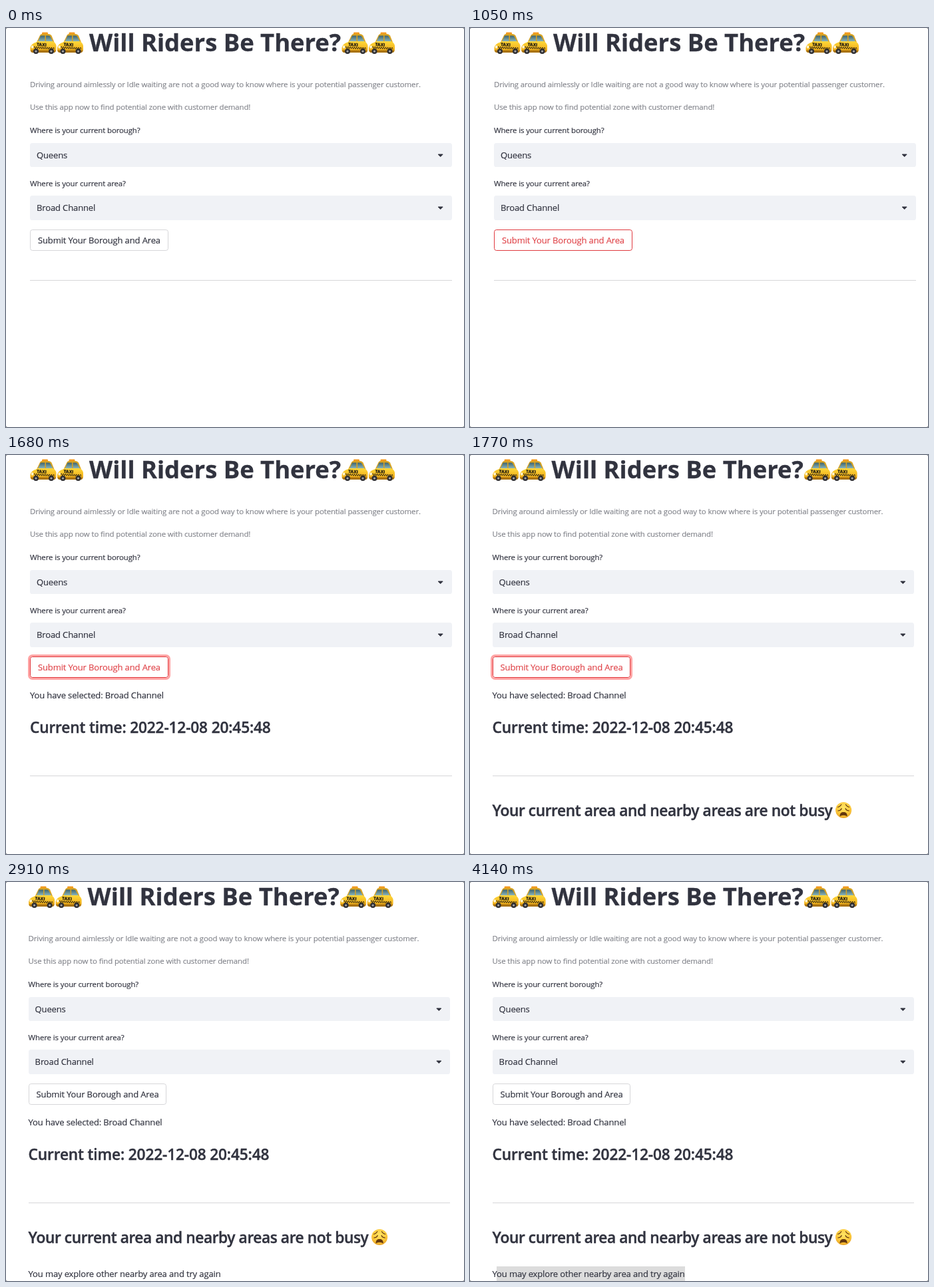
An HTML page that plays this animation: 688x600 px, repeating every 4.17 s.

```html
<!DOCTYPE html>
<html lang="en">
<head>
<meta charset="utf-8">
<title>Rider finder</title>
<style>
  html, body { margin: 0; width: 100%; height: 100%; overflow: hidden; background: #777; }
  svg { display: block; width: 688px; height: 600px; color: #31333f; }
  text {
    font-family: "Open Sans", "Noto Sans", sans-serif; white-space: pre;
    fill: currentColor; stroke: currentColor; stroke-width: .18px;
  }
  .body { font-size: 13px; letter-spacing: -.13px; }
  .small { font-size: 11.42px; letter-spacing: -.1px; }
  .note { color: #83858c; }
  .title { font-size: 36.4px; font-weight: 700; stroke-width: .3px; }
  .head { font-size: 22.7px; font-weight: 600; letter-spacing: -.4px; stroke-width: .4px; }
  .clock { letter-spacing: -.15px; }
  .sign { font: 800 6.4px "Open Sans", sans-serif; color: #2a2210; }
  .field { fill: #f0f2f6; }
  .rule { fill: #d6d6d9; }
  #edge { fill: #fff; stroke: #d6d6d9; }
  #ring { fill: #ff4b4b; fill-opacity: .5; }
  .hot #edge { stroke: #e0393e; }
  .hot #label { color: #e0474c; }
  .down #edge { fill: #ff4b4b; stroke: #ff4b4b; }
  .down #label { color: #fff; }
</style>
</head>
<body>
<svg id="stage" viewBox="0 0 688 600">
  <defs>
    <linearGradient id="paint" x2="0" y2="1">
      <stop offset="0" stop-color="#ffd83a"/><stop offset="1" stop-color="#eda512"/>
    </linearGradient>
    <linearGradient id="glass" x2="0" y2="1">
      <stop offset="0" stop-color="#3d6470"/><stop offset="1" stop-color="#8fb9bd"/>
    </linearGradient>
    <radialGradient id="skin" cy=".35" r=".7">
      <stop offset="0" stop-color="#ffe566"/><stop offset=".65" stop-color="#fbc638"/><stop offset="1" stop-color="#e39a22"/>
    </radialGradient>
    <g id="wheel">
      <circle r="4" fill="#2f2f33"/><circle r="1.600" fill="#a9a9ab"/>
    </g>
    <g id="taxi">
      <rect x="18" y="1" width="9" height="4" rx="1.200" fill="#f39a1e"/>
      <path d="M10 16 15 5.500Q16 3.500 18 3.500H28Q31 3.500 32.500 6L36.500 16Z" fill="#d9a321"/>
      <path d="M12 15 16 6H22.500V15ZM24 6H28.500Q30 6 31 8L34.500 15H24Z" fill="url(#glass)"/>
      <path d="M.5 24Q2 18 9 16L12 14.500H34Q38.500 16 39.500 21V27Q39 31 36 31H4Q1 31 .5 28Z" fill="url(#paint)"/>
      <path d="M1 28H39Q38.500 31.500 36 31.500H4Q1.500 31.500 1 28Z" fill="#a9720f"/>
      <use href="#wheel" x="9" y="29.500"/><use href="#wheel" x="32" y="29.500"/>
      <g transform="rotate(3 20 22)">
        <path d="M6 23.700H37M7.600 25.300H37" stroke="#2a2210" stroke-width="1.600" stroke-dasharray="1.600"/>
        <text class="sign" x="10" y="21.800">TAXI</text>
      </g>
      <ellipse cx="3.600" cy="23" rx="1.800" ry="2.200" fill="#fff4cf"/>
    </g>
  </defs>
  <rect width="688" height="600" rx="2.500" fill="#fff"/>
  <g id="boxes">
    <rect class="field" x="36" y="173" width="634" height="36" rx="3.600"/>
    <rect class="field" x="36" y="252" width="634" height="37" rx="3.600"/>
    <rect id="ring" x="33" y="300" width="214" height="38" rx="6.500"/>
    <rect x="36" y="303" width="208" height="32" rx="3.600" fill="#fff"/>
    <rect id="edge" x="36.5" y="303.5" width="207" height="31" rx="3.200"/>
    <rect class="rule" id="rule" x="36" width="634" height="1"/>
  </g>
  <rect id="mark" y="578" height="22"/>
  <g id="copy">
    <use href="#taxi" x="36" y="5.500"/><use href="#taxi" x="76.500" y="5.500"/>
    <use href="#taxi" x="504" y="5.500"/><use href="#taxi" x="544.500" y="5.500"/>
    <text class="title" x="125" y="35">Will Riders Be There?</text>
    <text class="small note" x="36" y="89">Driving around aimlessly or Idle waiting are not a good way to know where is your potential passenger customer.</text>
    <text class="small note" x="36" y="123">Use this app now to find potential zone with customer demand!</text>
    <text class="small" x="36" y="158">Where is your current borough?</text>
    <text class="body" x="46" y="196">Queens</text>
    <text class="small" x="36" y="238">Where is your current area?</text>
    <text class="body" x="46" y="275">Broad Channel</text>
    <path d="M649.200 190H656.200L652.700 193.500ZM649.200 269H656.200L652.700 272.500Z" fill="#31333f" stroke="#31333f" stroke-linejoin="round"/>
    <text class="body" id="label" x="48" y="324">Submit Your Borough and Area</text>
    <text class="body" id="chosen" x="36" y="366">You have selected: Broad Channel</text>
    <text class="head clock" id="clock" x="36" y="418">Current time: 2022-12-08 20:45:48</text>
    <g id="result">
      <text class="head" x="36" y="543">Your current area and nearby areas are not busy</text>
      <g transform="translate(563.500 534)" fill="none" stroke="#63370f" stroke-width="1.200" stroke-linecap="round">
        <circle r="12" fill="url(#skin)" stroke="none"/>
        <path d="M-8.500-4.500Q-5-5.500-3.300-8.300M8.500-4.500Q5-5.500 3.300-8.300M-8.300 1Q-4 .8-3-2.500M8.300 1Q4 .8 3-2.500"/>
        <path d="M-5 8.500Q-5 3.500 0 3.500T5 8.500Q0 6-5 8.500Z" fill="#63370f"/>
      </g>
    </g>
    <text class="body" id="advice" x="36" y="594">You may explore other nearby area and try again</text>
  </g>
</svg>
<script>
  const LOOP = 4170;
  const el = id => document.getElementById(id);
  const set = (node, attrs) => {
    for (const name in attrs) node.setAttribute(name, attrs[name]);
  };
  const show = (id, on) => set(el(id), { visibility: on ? 'visible' : 'hidden' });

  const boxes = [...el('boxes').children].map(node => ({
    node, x: +node.getAttribute('x'), w: +node.getAttribute('width')
  }));

  // Each step: start time and the values that change there.
  const steps = [
    [0, { button: '', ring: false, rule: 379, chosen: false, clock: false,
          result: false, advice: false, narrow: false, mark: null }],
    [1050, { button: 'hot' }],
    [1350, { button: 'hot down', ring: true }],
    [1440, { button: 'hot' }],
    [1650, { chosen: true, rule: 415 }],
    [1680, { clock: true, rule: 482 }],
    [1770, { result: true, narrow: true }],
    [1800, { advice: true }],
    [2910, { button: '', ring: false }],
    [3000, { mark: [34, 40, '#b3d7ff'] }],
    [3360, { mark: [40, 323, '#b3d7ff'] }],
    [4140, { mark: [40, 323, '#dcdcdc'] }]
  ];

  function render(s) {
    set(el('stage'), { class: s.button });
    set(el('rule'), { y: s.rule });
    for (const id of ['ring', 'chosen', 'clock', 'result', 'advice']) show(id, s[id]);

    // The scrollbar takes room, so the centred column moves left.
    set(el('copy'), { transform: `translate(${s.narrow ? -2.4 : 0} 0)` });
    for (const { node, x, w } of boxes) {
      set(node, { x: x - 2 * s.narrow, width: w - s.narrow });
    }

    show('mark', s.mark);
    if (s.mark) {
      const [from, to, fill] = s.mark;
      set(el('mark'), { x: from, width: to - from, fill });
    }
  }

  let last = -1;
  function tick() {
    const t = performance.now() % LOOP;
    const past = steps.filter(([start]) => start <= t);
    if (past.length !== last) {
      last = past.length;
      render(Object.assign({}, ...past.map(step => step[1])));
    }
    requestAnimationFrame(tick);
  }
  tick();
</script>
</body>
</html>
```
